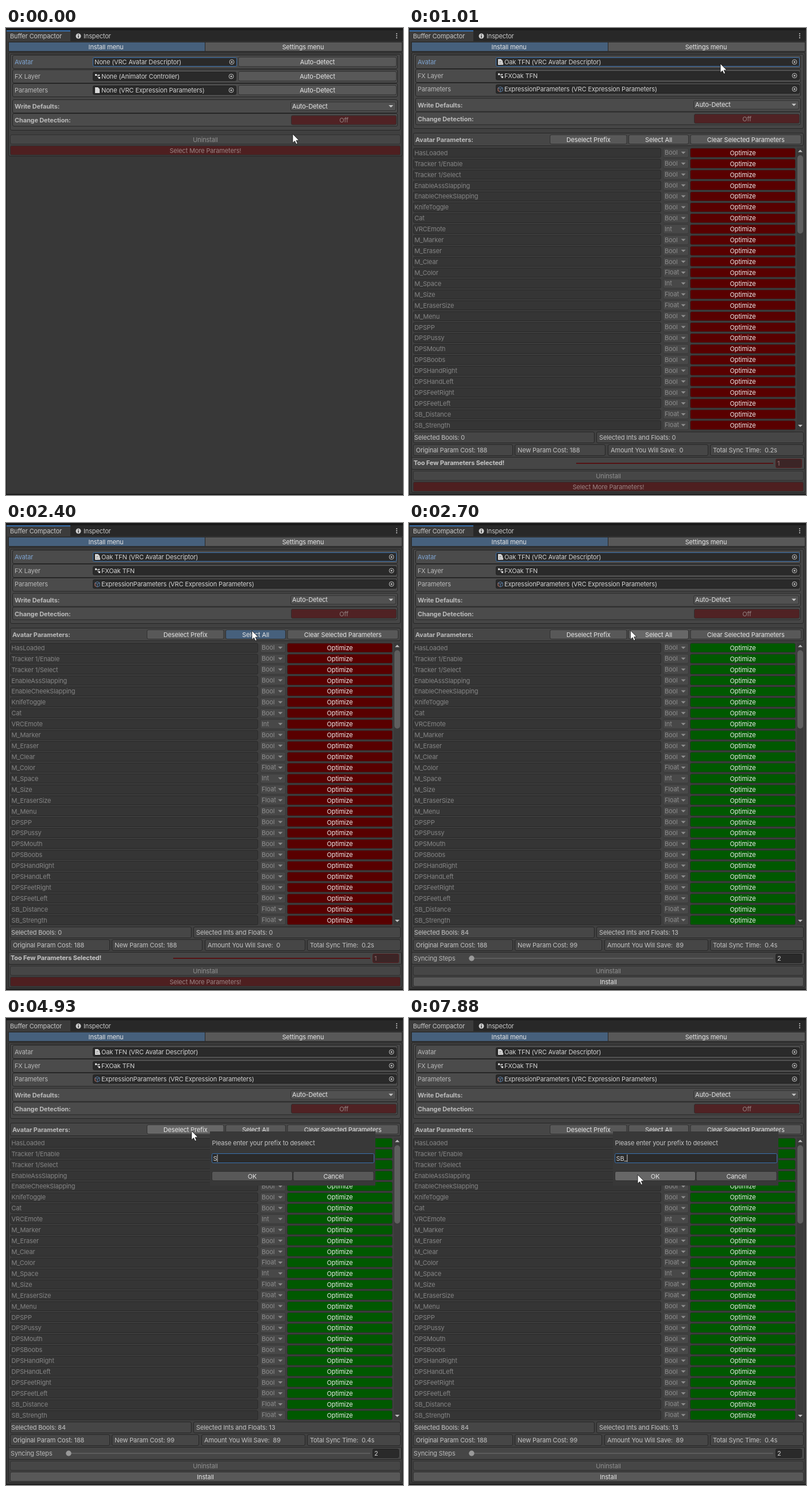
An HTML page for the animation above (8 s loop, 691 px wide and 811 px high).

```html
<!DOCTYPE html>
<html lang="en">
<head>
<meta charset="utf-8">
<title>Parameter tool</title>
<style>
html, body { margin: 0; width: 100%; height: 100%; overflow: hidden; background: #383838; }
svg { display: block; width: 100%; height: 100%; }
text { font: 11px Inter, "Open Sans", sans-serif; letter-spacing: -.15px; white-space: pre; }
.b { font-weight: 700; }
.m { text-anchor: middle; }
</style>
</head>
<body>
<svg id="stage" viewBox="0 0 691 811" xmlns="http://www.w3.org/2000/svg"></svg>
<script>
const LOOP = 8000;
const NORMAL = '#585858', HOVER = '#676767', PRESSED = '#46607c';
const FOCUS = '#3a72b0', LABEL = '#b9b9b9', WHITE = '#e6e6e6', DIM = '#858585';

// Shapes are given as left, top, right, bottom.
const rect = (x, y, r, b, fill, extra = '') =>
  `<rect x="${x}" y="${y}" width="${r - x}" height="${b - y}" fill="${fill}" ${extra}/>`;
const text = (x, cy, s, fill = LABEL, cls = '') =>
  `<text x="${x}" y="${cy + 4}" fill="${fill}" class="${cls}">${s}</text>`;
const group = (id, body) => `<g id="${id}">${body}</g>`;
const box = (x, y, r, b) =>
  rect(x + .5, y + .5, r - .5, b - .5, '#606060', 'fill-opacity=".2" stroke="#262626" rx="2.5"');
const button = (x, y, r, b, label, id = '', fill = NORMAL, color = WHITE) =>
  rect(x + .5, y + .5, r - .5, b - .5, fill, `stroke="#303030" rx="2.5" ${id && `id="${id}"`}`) +
  text((x + r) / 2, (y + b) / 2, label, color, 'm');
const arrow = (x, y, fill, up = 1) =>
  `<path d="M${x - 4} ${y - 2 * up}h8l-4 ${4 * up}z" fill="${fill}"/>`;

const icons = {
  none: () => '',
  page: (x, y) => `<path d="M${x} ${y - 5}h5l3 3v7h-8z" fill="#d8d8d8"/>`,
  script: (x, y) => `<path d="M${x} ${y - 5}h5l3 3v7h-8z" fill="#d8d8d8"/>` +
    `<path d="M${x + 2} ${y - 1}h4m-4 3h2" stroke="#777"/>` + rect(x + 4, y + 1, x + 9, y + 5, '#c9c9c9'),
  nodes: (x, y) => `<path d="M${x + 2} ${y - 2}h3v4h2M${x + 5} ${y - 2}h2" fill="none" stroke="#bbb"/>` +
    rect(x, y - 4, x + 3, y - 1, '#ddd') + rect(x + 6, y + 1, x + 9, y + 4, '#ddd') +
    rect(x + 6, y - 3, x + 8, y - 1, '#ddd'),
  cube: (x, y) => `<path d="M${x + 4} ${y - 4}l4 2v5l-4 2-4-2v-5zm0 4l4-2m-4 2v5m0-5l-4-2" fill="none" stroke="#5b7fa6"/>` +
    `<path d="M${x} ${y - 2}v5l3 1.5" fill="none" stroke="#b0583c"/>`
};

function field(r, y, b, label, icon, id = '', border = '#212121') {
  const cy = (y + b) / 2;
  return rect(151.5, y + .5, r - .5, b - .5, '#2a2a2a', `stroke="${border}" rx="2" ${id && `id="${id}"`}`) +
    icons[icon](155, cy) + text(icon === 'none' ? 154 : 166, cy, label, '#d2d2d2') +
    `<circle cx="${r - 9}" cy="${cy}" r="4" fill="none" stroke="#c0c0c0"/>` +
    `<circle cx="${r - 9}" cy="${cy}" r="1.6" fill="#c0c0c0"/>`;
}

function options(y) {
  return box(11, y, 682, y + 24) + text(15, y + 12, 'Write Defaults:', LABEL, 'b') +
    button(495, y + 4, 679, y + 20, '', '', '#515151') +
    text(498, y + 11.5, 'Auto-Detect', WHITE) + arrow(670, y + 12, '#c8c8c8') +
    box(11, y + 24, 682, y + 47) + text(15, y + 36, 'Change Detection:', LABEL, 'b') +
    button(496, y + 27.5, 680, y + 44.5, 'Off', '', '#502224', '#948484');
}

function chrome() {
  return rect(0, 0, 691, 811, '#383838') + rect(0, 0, 691, 4, '#191919') +
    rect(0, 4, 691, 23, '#282828') + rect(0, 4, 112, 23, '#3c3c3c') +
    rect(1, 4, 112, 6, FOCUS, 'id="tabLine"') +
    text(7, 14, 'Buffer Compactor', '#c8c8c8') + text(135, 14, 'Inspector', '#c8c8c8') +
    '<circle cx="126" cy="14" r="4.5" fill="#d0d0d0"/><path d="M126 11v1.3m0 1v3.5" stroke="#282828" stroke-width="1.5"/>' +
    [10, 13.5, 17].map(y => `<circle cx="680" cy="${y}" r="1.1" fill="#c8c8c8"/>`).join('') +
    rect(4.5, 24.5, 346.5, 40.5, PRESSED, 'stroke="#262626"') + text(174, 32.5, 'Install menu', WHITE, 'm') +
    rect(346.5, 24.5, 689.5, 40.5, NORMAL, 'stroke="#262626"') + text(517, 32.5, 'Settings menu', WHITE, 'm');
}

function emptyPanel() {
  const rows = [
    [47, 'FX', 'None (VRC Avatar Descriptor)', 'none', 'Auto-detect'],
    [72, 'FX Layer', 'None (Animator Controller)', 'nodes', 'Auto-Detect'],
    [96, 'Parameters', 'None (VRC Expression Parameters)', 'page', 'Auto-Detect']
  ];
  return box(4, 42, 690, 223) + box(7, 45, 687, 178) + rows.map(([y, label, value, icon, action], i) =>
    box(11, y, 682, y + 24) + text(15, y + 12, i ? label : 'Avatar', i ? LABEL : '#7ea3d0') +
    field(i ? 401 : 402, y + 4, y + 20, value, icon, '', i ? '#212121' : FOCUS) +
    button(404, y + 3, 680, y + 20.5, action, i ? '' : 'detect')).join('') +
    options(124) +
    button(7, 185, 687, 202, 'Uninstall', '', '#464646', '#909090') +
    button(7, 204, 687, 221, 'Select More Parameters!', '', '#4e1f20', '#9a8484');
}

const params = ('HasLoaded,Tracker 1/Enable,Tracker 1/Select,EnableAssSlapping,EnableCheekSlapping,' +
  'KnifeToggle,Cat,VRCEmote,M_Marker,M_Eraser,M_Clear,M_Color,M_Space,M_Size,M_EraserSize,M_Menu,' +
  'DPSPP,DPSPussy,DPSMouth,DPSBoobs,DPSHandRight,DPSHandLeft,DPSFeetRight,DPSFeetLeft,' +
  'SB_Distance,SB_Strength').split(',');
const typeOf = name => /Emote|Space/.test(name) ? 'Int' : /Color|Size|^SB_/.test(name) ? 'Float' : 'Bool';
const rowY = i => 216.8 + 18.92 * i;

function paramList() {
  return params.map((name, i) => {
    const y = rowY(i);
    return rect(7.5, y - 8, 438.5, y + 8, '#353535', 'stroke="#292929" rx="2.5"') + text(9.5, y, name, DIM) +
      rect(442.5, y - 8, 486.5, y + 8, '#484848', 'stroke="#383838" rx="2.5"') +
      text(445, y - .5, typeOf(name), '#8d8d8d') + arrow(477.5, y, '#8d8d8d');
  }).join('') +
    rect(675, 208, 687, 698, '#3a3a3a') + rect(676, 221, 686, 357, '#5f5f5f', 'rx="5"') +
    arrow(681, 213.5, '#c0c0c0', -1) + arrow(681, 691, '#c0c0c0');
}

const optimize = fill => params.map((_, i) =>
  button(489, rowY(i) - 8.5, 673, rowY(i) + 8.5, 'Optimize', '', fill, '#eee')).join('');

function totals(bools, others, cost, saved, sync, split) {
  const cell = (x, y, r, s) => box(x, y, r, y + 20) + text(x + 5, y + 10, s, '#c4c4c4');
  return cell(7, 701, 323, 'Selected Bools: ' + bools).replace('x="12"', 'x="9"') +
    cell(326, 701, 687, 'Selected Ints and Floats: ' + others) +
    cell(7, 723, 181, 'Original Param Cost: 188') + cell(184, 723, split, 'New Param Cost: ' + cost) +
    cell(split + 4, 723, 521, 'Amount You Will Save:  ' + saved) +
    cell(524, 723, 687, `Total Sync Time:  ${sync}s`) + box(4, 745, 689, 767);
}

function loadedPanel() {
  const few = optimize('#590000') + totals(0, 0, 188, 0, 0.2, 342) +
    text(8, 755, 'Too Few Parameters Selected!', '#c4c4c4', 'b') + rect(291, 755, 634, 757, '#551214') +
    rect(638.5, 748.5, 683.5, 763.5, '#3c2526', 'stroke="#541d1f" rx="2"') + text(641, 756, '1', '#947070') +
    button(7, 788, 687, 805, 'Select More Parameters!', '', '#4e1f20', '#9a8484');
  const many = optimize('#005900') + totals(84, 13, 99, 89, 0.4, 336) +
    text(8, 756, 'Syncing Steps') + rect(104, 755, 634, 757, '#5c5c5c') +
    '<circle cx="109" cy="756" r="4.7" fill="#999"/>' +
    rect(638.5, 748.5, 683.5, 763.5, '#2a2a2a', 'stroke="#212121" rx="2"') + text(641, 756, '2', '#d2d2d2') +
    button(7, 788, 687, 805, 'Install');
  return box(4, 42, 690, 807) + box(7, 45, 687, 175) +
    [47, 71, 95].map(y => box(11, y, 682, y + 24)).join('') +
    text(15, 59, 'Avatar').replace('<text', '<text id="avatar"') +
    text(15, 82.5, 'FX Layer') + text(15, 106, 'Parameters') +
    field(680, 51, 67, 'Oak TFN (VRC Avatar Descriptor)', 'script', 'avatarField') +
    field(680, 75, 90.5, 'FXOak TFN', 'nodes') +
    field(680, 98, 114, 'ExpressionParameters (VRC Expression Parameters)', 'cube') +
    options(121.5) +
    box(7, 182, 687, 205) + text(11, 193.5, 'Avatar Parameters:', LABEL, 'b') +
    button(245, 185, 379.5, 202, 'Deselect Prefix', 'deselect') +
    button(382, 185, 487, 202, 'Select All', 'selectAll') +
    button(489.5, 185, 683, 202, 'Clear Selected Parameters') +
    paramList() + group('few', few) + group('many', many) +
    button(7, 769, 687, 786, 'Uninstall', '', '#464646', '#909090');
}

const dialog = () => rect(355, 197, 643, 291, '#383838') +
  text(358.5, 216.5, 'Please enter your prefix to deselect', '#c4c4c4') +
  rect(358.5, 235.5, 640.5, 251.5, '#2a2a2a', `stroke="${FOCUS}" rx="2"`) +
  '<text id="typed" x="360.5" y="247.5" fill="#d2d2d2"></text>' +
  rect(360, 237, 361, 250, '#c8c8c8', 'id="caret"') +
  button(358, 266, 499, 283, 'OK', 'ok') + button(499.5, 266, 640.5, 283, 'Cancel');

const stage = document.getElementById('stage');
stage.innerHTML = chrome() + group('empty', emptyPanel()) + group('loaded', loadedPanel()) +
  rect(0, 4, 1, 811, '#202020') + rect(0, 809, 691, 811, '#1c1c1c') + group('dialog', dialog()) +
  '<path id="cursor" d="M0 0V15.6L3.6 12.2 6 17.6 8.5 16.5 6.2 11.2H11Z" fill="#fff" stroke="#111" stroke-width=".8"/>';

const el = {};
stage.querySelectorAll('[id]').forEach(n => el[n.id] = n);
const show = (id, on) => el[id].style.display = on ? '' : 'none';
const paint = (id, fill, attr = 'fill') => el[id].setAttribute(attr, fill);

// Cursor stops: time, x, y.
const path = [
  [0, 499, 184], [140, 499, 184], [570, 542, 62], [1640, 542, 62], [2230, 428, 187],
  [2530, 428, 187], [2940, 315, 186], [3199, 315, 186], [3200, 326, 186], [3339, 326, 186],
  [3340, 326, 195], [3869, 326, 195], [3870, 323, 196], [7400, 323, 196], [7610, 398, 264],
  [7839, 398, 264], [7840, 398, 268], [7879, 398, 268], [7880, 398, 272], [LOOP, 398, 272]
];

function cursorAt(t) {
  const i = path.findIndex(p => p[0] > t);
  const [t0, x0, y0] = path[i - 1], [t1, x1, y1] = path[i];
  const k = (t - t0) / (t1 - t0), e = k * k * (3 - 2 * k);
  return [x0 + (x1 - x0) * e, y0 + (y1 - y0) * e];
}

function draw(t) {
  const [x, y] = cursorAt(t);
  const inside = (l, r) => x > l && x < r && y > 185 && y < 202;
  const focused = t < 3540;
  el.cursor.setAttribute('transform', `translate(${x} ${y})`);
  show('empty', t < 1010);
  show('loaded', t >= 1010);
  show('few', t < 2530);
  show('many', t >= 2530);
  show('dialog', t >= 3440);
  show('tabLine', focused);
  paint('avatar', focused ? '#7ea3d0' : LABEL);
  paint('avatarField', focused ? FOCUS : '#212121', 'stroke');
  paint('detect', t >= 870 ? PRESSED : t >= 770 ? HOVER : NORMAL);
  paint('selectAll', t >= 2370 && t < 2530 ? PRESSED : inside(382, 487) ? HOVER : NORMAL);
  paint('deselect', t >= 3340 && t < 3540 ? PRESSED : inside(245, 380) ? HOVER : NORMAL);
  paint('ok', t >= 7840 ? HOVER : NORMAL);
  const typed = 'SB_'.slice(0, t < 4930 ? 0 : t < 5060 ? 1 : t < 6060 ? 2 : 3);
  if (el.typed.textContent !== typed) el.typed.textContent = typed;
  el.caret.setAttribute('x', typed ? 360.5 + el.typed.getComputedTextLength() : 360.5);
}

const start = performance.now();
function tick() {
  draw((performance.now() - start) % LOOP);
  requestAnimationFrame(tick);
}
draw(0);
requestAnimationFrame(tick);
</script>
</body>
</html>
```
